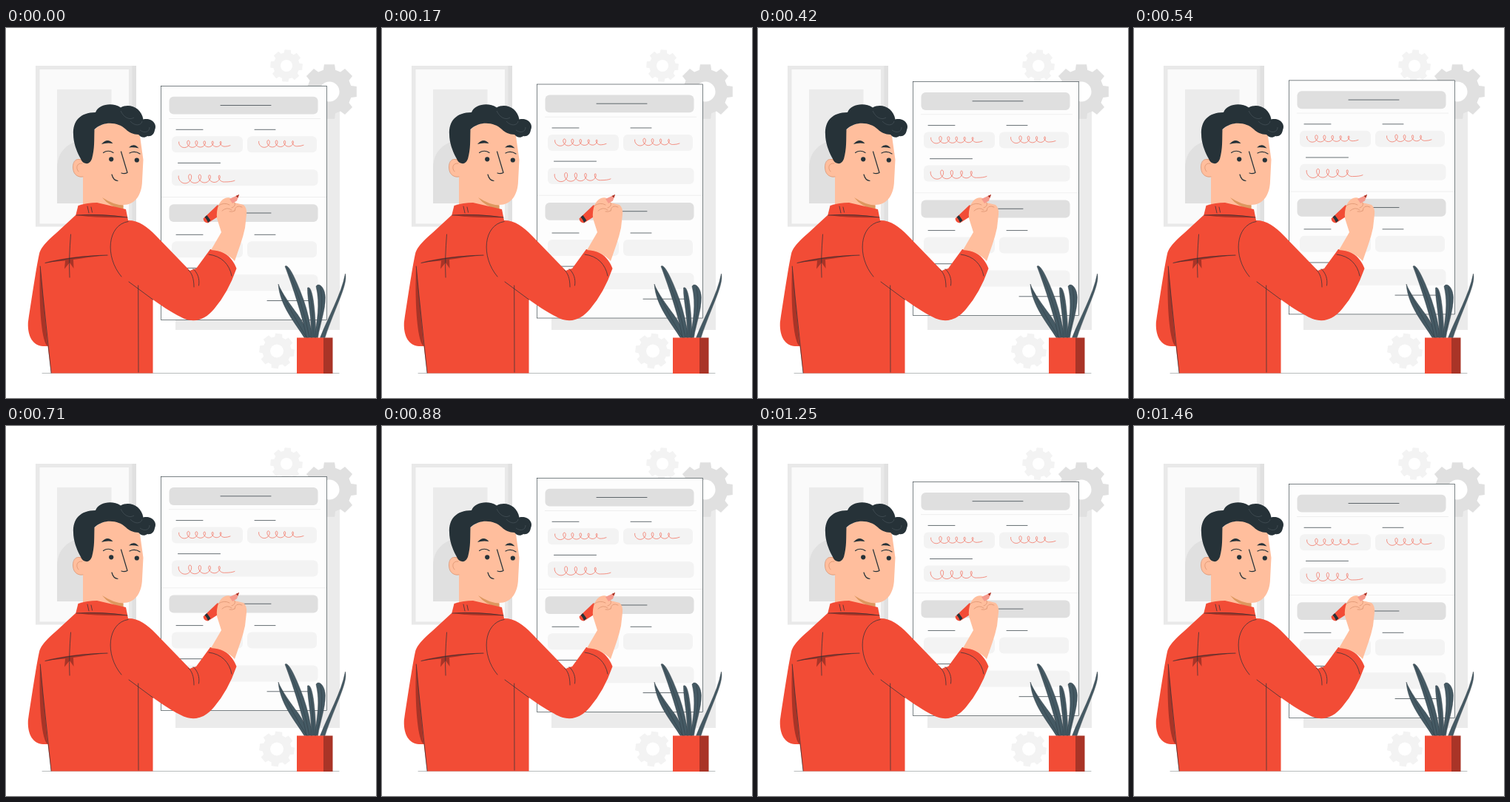
An HTML page that plays this animation: 500 px wide and 500 px high, repeating every 1.5 s.

```html
<!DOCTYPE html>
<html lang="en">
<head>
<meta charset="utf-8">
<title>Filling in a form</title>
<style>
html, body { margin: 0; width: 100%; height: 100%; overflow: hidden; background: #fff; }
svg { display: block; width: 100vw; height: 100vh; }
.ink { fill: none; stroke: #263238; stroke-width: .7; stroke-linecap: round; stroke-linejoin: round; }
.pen { fill: none; stroke: #f24c36; stroke-width: .6; stroke-linecap: round; }
.red { fill: #f24c36; }
.shade { fill: #a93427; }
.skin { fill: #ffbe9d; }
.dark { fill: #263238; }
.leaf { fill: #455a64; stroke: #263238; stroke-width: .4; }
.fold { fill: none; stroke: #d78f6c; stroke-width: .7; stroke-linecap: round; }
</style>
</head>
<body>
<svg viewBox="0 0 500 500">
  <!-- picture on the wall -->
  <rect x="40" y="51" width="136" height="217.5" fill="#e9e9e9"/>
  <rect x="170.500" y="51" width="5.500" height="217.500" fill="#e0e0e0"/>
  <rect x="45.500" y="56" width="120.500" height="208.500" fill="#fafafa"/>
  <rect x="69" y="83" width="73.500" height="154" fill="#ebebeb"/>
  <path d="M69 237V189C69 166 86 152 106 152C127 152 142.500 168 142.500 189V237Z" fill="#e0e0e0"/>

  <path d="M49 466.500H450" class="ink" style="stroke:#9a9fa1"/>
  <rect x="229" y="101" width="222" height="307" fill="#ebebeb"/>
  <g id="gears"></g>

  <g id="sheet"></g>

  <!-- torso and arms -->
  <path class="red" d="M94 253L68 277Q49 293 45.500 303C43 312 37 350 29.800 398C29 418 37 429 50 430H56.500L61 466.500H198.500V367C215 379 229 387 240 392.500C257 399 270 393 281 380Q300 358 311.500 325C306 309 292 299 276 299L257 325Q252 326 248.500 328L203 281C190 268 180 260 165 260Z"/>
  <path class="shade" d="M46.200 322C44 366 47 424 56.300 430L50 362Z"/>
  <path class="shade" d="M53 317C74 311 105 307 140 307C120 308.500 106 311 91 313L91.500 325L86 317L79 325.500L80 314.500Z"/>
  <g class="ink">
    <path d="M46.200 322L50 362L61 466"/>
    <path d="M53 317.500C79 312 108 307.500 137 307M87.500 279C86 298 85 318 86 337"/>
    <path d="M165 261.500C137 266 133 309 156 336M166 343L198.500 367M178.700 348L179 465"/>
    <path d="M246.500 327C251 331 254 338 254 350M253 325.500C259 331 262 339 260.500 348"/>
    <path d="M274 306C291 308 302 319 305 335"/>
  </g>

  <!-- head -->
  <path class="skin" d="M104 180V242Q131 247 158.500 246V239C174 239 183.500 226 184 207L185.500 178L181 146C168 122 128 122 116 142Z"/>
  <path d="M130 229Q145 239 158.500 239.500V246Q139 241 130 229Z" fill="#dd975f"/>
  <path class="skin" d="M107 179C97 174 90 179 90.500 189C91 199 99 204 107 200Z"/>
  <path class="fold" d="M103 183C95 182 94 190 98 194M105 180C96 174 90 179 90.500 189C91 199 98 202 104 201"/>
  <path class="dark" d="M91 144C90 126 100 114 121 114C125 103 144 100 155 107.500C167 101 183 108 185.500 123.500C197 121 205 130 201 138C200 144 196 147 191 146C187 149 182 148 179 144C172 144 166 141 162 137C152 127 132 125 119.500 137C119 151 120 163 116 177Q113 184 108 183C102 182 102 178 100 175C95 166 91 154 91 144Z"/>
  <path d="M155 112C159 121 167 125 173 121M168 126C174 133 183 132 184 126M181 138C188 143 194 140 194 134" fill="none" stroke="#4d5a60" stroke-width=".6"/>
  <g class="dark">
    <circle cx="142.200" cy="177.300" r="3.100"/>
    <circle cx="176.800" cy="178.500" r="3.100"/>
    <path d="M129 157Q137 147.500 144.500 156Q136 154.500 129 157ZM166 161.500Q173 154.500 179.500 162.500Q172 160.500 166 161.500Z"/>
  </g>
  <g class="ink" style="stroke-width:1.200">
    <path d="M131.500 168.500Q138 164 145 168.500M167 169Q174 165.500 181 170"/>
    <path d="M155.500 167L164 195.500Q160 197.500 156 196M143 198Q145 206 151 206.500"/>
  </g>

  <!-- collar -->
  <path class="red" d="M94 254L97.500 240Q110 236 123 236L162 245L165 260Q130 262 94 254Z"/>
  <path class="shade" d="M95 253Q130 250 164.500 256Q125 257 95 253Z"/>
  <path class="ink" d="M95 253Q130 251 164 256M110 241L112 250M115 242L116.500 249"/>

  <!-- pencil and hand -->
  <path class="red" d="M266.500 257.500L286 239L294 250L273 263.500Q267 263 266.500 257.500Z"/>
  <path class="dark" d="M268.500 255.500L271.500 253L276.500 260L273 263Q271 258 268.500 255.500Z"/>
  <path class="skin" d="M277 300L291 276L285 257C284 244 288 233 296 230C302 228 307 231 309 236L321 239Q326 243 325 252L323 270C320 285 314 300 309 315Q296 301 277 300Z"/>
  <path d="M302 231L315 225L312 233.500L306 237Z" fill="#f59a8d"/>
  <path d="M310.500 227L315 225L313.500 229.500Z" fill="#a93427"/>
  <path class="fold" d="M287 240Q295 235 302 239M309 236Q311 241 305 243M292 247Q299 241 305 246M309 247Q310 238 319 242M302 248Q306 249 309 247"/>

  <!-- plant -->
  <path class="leaf" d="M368 346C372 357 385 375 394 387Q405 402 409 418.500H403C392 400 370 376 368 346Z"/>
  <path class="leaf" d="M377 322C382 317 394 345 402 367Q410 390 414 418.500H406C402 394 388 351 377 322Z"/>
  <path class="leaf" d="M407.500 351C414 347 418 378 419 418.500H412C414 393 407 369 407.500 351Z"/>
  <path class="leaf" d="M419 349C423 343 431 351 431.500 364C431.500 382 424 401 421.500 418.500H417C420 396 425 374 419 349Z"/>
  <path class="leaf" d="M458.500 332C462 347 446 374 431 418.500H424.500C435 391 453 361 458.500 332Z"/>
  <path class="ink" style="stroke-width:.400" d="M380 324Q402 374 410 418M371 355Q387 387 406 418M410 354Q416 383 415 418M425 350Q431 377 419 418"/>
  <rect class="red" x="393" y="418.500" width="36" height="48.500"/>
  <rect class="shade" x="429" y="418.500" width="12.500" height="48.500"/>
</svg>
<script>
const $ = id => document.getElementById(id);

function gear(cx, cy, r, hole, turn, color) {
  const at = (rad, a) => `${(cx + rad * Math.cos(a)).toFixed(2)} ${(cy + rad * Math.sin(a)).toFixed(2)}`;
  const base = r * .81, pts = [];
  for (let i = 0; i < 8; i++) {
    const a = turn + i * Math.PI / 4;
    pts.push(at(base, a - .27), at(r, a - .19), at(r, a + .19), at(base, a + .27));
  }
  return `<path d="M${pts.join('L')}Z" fill="${color}"/><circle cx="${cx}" cy="${cy}" r="${hole}" fill="#fff"/>`;
}

const box = (x, y, w, h, fill, r = 6) =>
  `<rect x="${x}" y="${y}" width="${w}" height="${h}" rx="${r}" fill="${fill}"/>`;
const line = (x1, x2, y) => `<path class="ink" d="M${x1} ${y}H${x2}"/>`;
const rule = (x1, x2, y) => `<path d="M${x1} ${y}H${x2}" stroke="#ebebeb" stroke-width=".8"/>`;

// A row of handwritten loops with a tail that ends at x = end
function scribble(x, y, loops, pitch, w, h, end) {
  const pts = [];
  for (let u = -.35; u <= loops + .05; u += 1 / 24) {
    const a = u * 2 * Math.PI, size = 1 - .3 * u / loops;
    const px = x + pitch * u + w * size * Math.sin(a);
    pts.push(`${px.toFixed(2)} ${(y + h * size * Math.cos(a)).toFixed(2)}`);
  }
  return `<path class="pen" d="M${pts.join('L')}Q${end - 4} ${y + h * .7} ${end} ${y + h * .4}"/>`;
}

function form() {
  const field = '#f3f3f3', bar = '#dfdfdf';
  let s = '<rect x="209.5" y="78.300" width="224" height="316" fill="#fdfdfd" stroke="#263238" stroke-width=".6"/>';
  s += rule(220, 425, 122.5) + rule(210, 433, 228.5);
  for (const y of [92.8, 238.3]) {
    s += box(220.5, y, 201, 23.8, bar) + line(290, 358, y + 11.7);
  }
  for (const y of [146.3, 288.3]) {
    s += line(230, 266, y - 9) + line(336, 364, y - 9);
    s += box(224, y, 96, 22, field) + box(326, y, 94, 22, field);
    s += line(232.5, 289.5, y + 36.1) + box(224, y + 45, 197.5, 22, field);
  }
  s += line(353, 411, 368.5);
  s += scribble(241, 156.8, 5, 10.9, 4.2, 4.8, 303);
  s += scribble(349, 156.3, 4, 11, 4.2, 5, 402);
  s += scribble(242, 203.7, 4, 13.2, 5, 6.2, 309);
  return s;
}

$('gears').innerHTML =
  gear(437, 86, 37.5, 13.5, 0, '#e0e0e0') +
  gear(379, 51, 22, 8, .08, '#f3f3f3') +
  gear(366, 436.5, 24, 9, .12, '#f3f3f3');
$('sheet').innerHTML = form();

// The sheet rises 10 units and sinks back at an even pace, 24 steps a second
const loop = 1500, steps = 36, rise = 10;

function draw(t) {
  const i = Math.floor((t % loop + 4) * steps / loop) % steps;
  const p = i / (steps - 1);
  const y = -rise * (1 - Math.abs(2 * p - 1));
  $('sheet').setAttribute('transform', `translate(0 ${y.toFixed(3)})`);
}

let start = null;
function tick(now) {
  if (start === null) start = now;
  draw(now - start);
  requestAnimationFrame(tick);
}
draw(0);
requestAnimationFrame(tick);
</script>
</body>
</html>
```
